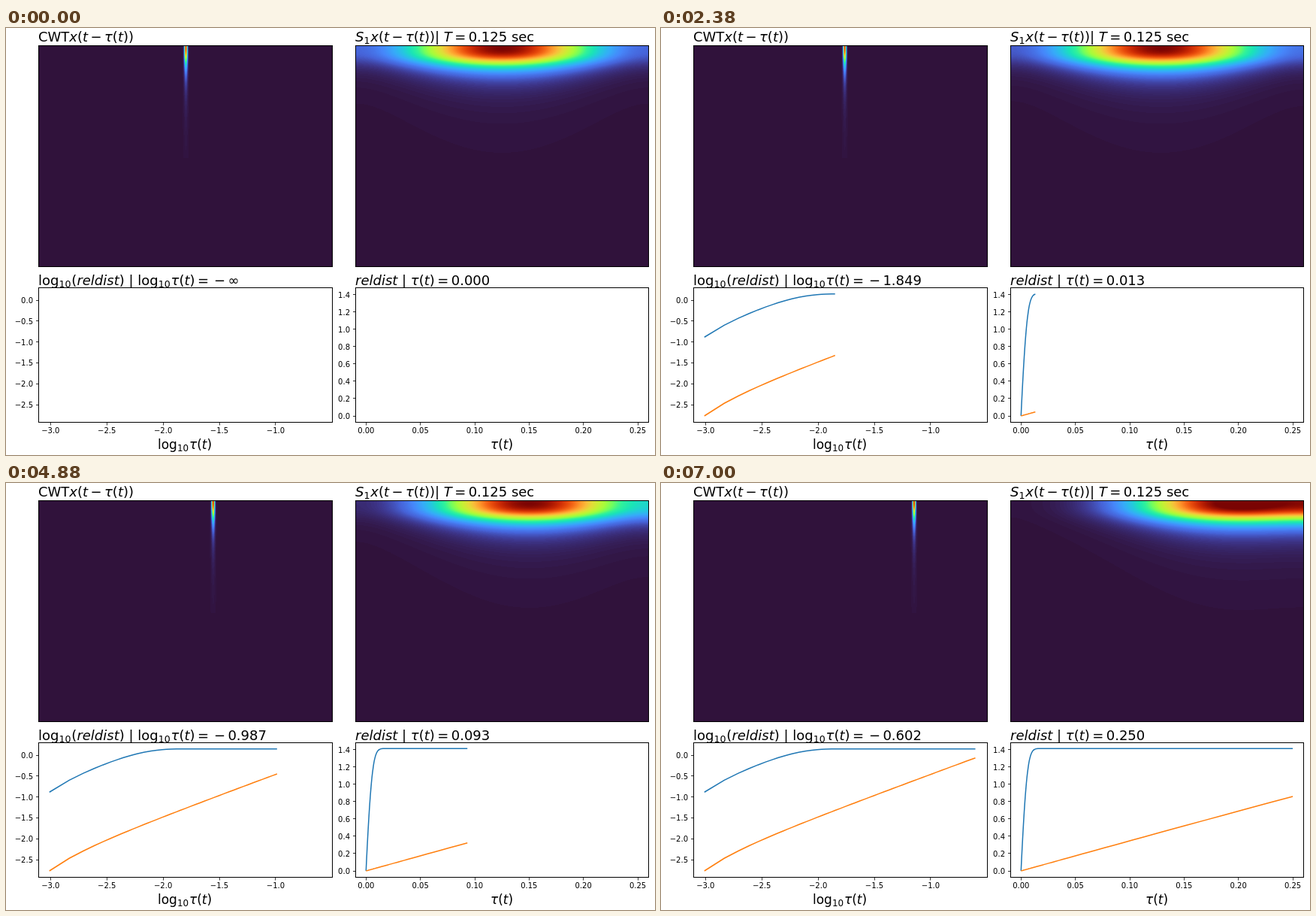
These frames come from a looping animation (864x568 px, 7.26 s). An HTML page with a canvas:

```html
<!DOCTYPE html>
<html lang="en">
<head>
<meta charset="utf-8">
<title>Time-shift distances</title>
<style>
html, body { margin: 0; width: 100%; height: 100%; overflow: hidden; background: #fff; }
canvas { display: block; }
</style>
</head>
<body>
<canvas id="stage" width="864" height="568"></canvas>
<script>
const g = document.getElementById('stage').getContext('2d');
const FONT = '"DejaVu Sans", Verdana, sans-serif';
const BLUE = '#1f77b4', ORANGE = '#ff7f0e';
const LOOP = 7260, STEP = 125, RATE = 2048, LAST = 49;

// Shifts in samples: log-spaced 1..512, rounded up, without repeats
const shifts = [...new Set(Array.from({ length: 64 },
  (_, j) => Math.ceil(512 ** (j / 63) - 1e-9)))];

// Relative distances after a shift of m samples
const waveDist = m => Math.sqrt(2 - 2 * Math.exp(-0.0085 * m ** 1.924));
const scatDist = m => { const s = m / RATE; return 3.48 * s - 0.6 * s ** 3; };

// Colour map, interpolated between even stops
const stops = ['30123b', '3d358b', '4662d7', '4686fa', '36aaf9', '24c8de', '1ae4b6',
  '32f298', '72fe5e', 'a4fc3c', 'c7ef34', 'e2dc38', 'faba39', 'fe962b', 'f66b19',
  'e5470b', 'cb2a04', 'a51401', '7a0403']
  .map(h => [0, 2, 4].map(i => parseInt(h.slice(i, i + 2), 16)));
const palette = Array.from({ length: 256 }, (_, i) => {
  const p = i / 255 * 18, k = Math.min(17, Math.floor(p));
  return stops[k].map((c, j) => c + (stops[k + 1][j] - c) * (p - k));
});

const bell = (d, s) => Math.exp(-d * d / (2 * s * s));
const fall = (u, half, power) => 1 / (1 + (u / half) ** power);

function heatmap(x0, value) {
  const w = 390, h = 294, img = g.createImageData(w, h);
  for (let y = 0, i = 0; y < h; y++) {
    for (let x = 0; x < w; x++, i += 4) {
      const v = y < 150 ? Math.min(1, value(x, y)) : 0;
      const c = palette[Math.round(v * 255)];
      img.data[i] = c[0];
      img.data[i + 1] = c[1];
      img.data[i + 2] = c[2];
      img.data[i + 3] = 255;
    }
  }
  g.putImageData(img, x0, 23);
}

// Markup: *italic*, {subscript}, ~ thin gap
function rich(x, y, size, text) {
  let italic = false;
  g.textAlign = 'left';
  for (const part of text.match(/\*|~|\{[^}]*\}|[^*~{]+/g)) {
    if (part === '*') { italic = !italic; continue; }
    if (part === '~') { x += size * 0.19; continue; }
    const sub = part[0] === '{';
    const str = sub ? part.slice(1, -1) : part;
    g.font = `${italic ? 'italic ' : ''}${size * (sub ? 0.7 : 1)}px ${FONT}`;
    g.fillText(str, x, y + (sub ? size * 0.16 : 0));
    x += g.measureText(str).width + (sub ? size * 0.05 : 0);
  }
}

function line(points, color, width) {
  g.beginPath();
  points.forEach(p => g.lineTo(p[0], p[1]));
  g.strokeStyle = color;
  g.lineWidth = width;
  g.stroke();
}

const box = (x, y, w, h) => {
  g.strokeStyle = '#000';
  g.lineWidth = 1;
  g.strokeRect(x + 0.5, y + 0.5, w, h);
};

const logPlot = {
  x: 43, w: 391, px: v => 59.3 + (v + 3) * 149.8, py: v => 362 - v * 55.6,
  xt: [-3, -2.5, -2, -1.5, -1], xd: 1, yt: [0, -0.5, -1, -1.5, -2, -2.5]
};
const linPlot = {
  x: 465, w: 390, px: v => 479.3 + v * 1447, py: v => 516 - v * 115.1,
  xt: [0, 0.05, 0.1, 0.15, 0.2, 0.25], xd: 2, yt: [0, 0.2, 0.4, 0.6, 0.8, 1, 1.2, 1.4]
};

const label = (v, d) => v.toFixed(d).replace('-', '\u2212');
const crisp = v => Math.floor(v) + 0.5;

function axes(p) {
  g.font = `10px ${FONT}`;
  g.textAlign = 'center';
  for (const v of p.xt) {
    const x = p.px(v);
    line([[crisp(x), 525], [crisp(x), 528.5]], '#000', 0.8);
    g.fillText(label(v, p.xd), x, 539);
  }
  g.textAlign = 'right';
  for (const v of p.yt) {
    const y = p.py(v);
    line([[p.x - 3, crisp(y)], [p.x, crisp(y)]], '#000', 0.8);
    g.fillText(label(v, 1), p.x - 7, y + 4);
  }
  box(p.x, 345, p.w, 179);
}

function draw(n) {
  const lead = shifts[Math.min(n + 1, shifts.length - 1)];
  const m = n ? shifts[Math.min(n, shifts.length - 1)] : 0;
  const tau = m / RATE;

  g.fillStyle = '#fff';
  g.fillRect(0, 0, 864, 568);
  g.fillStyle = '#000';

  const c = 195 + tau * 390;
  heatmap(44, (x, y) => 0.9 * bell(x - c, 1.3 + y * 0.008) * fall(y, 20, 2.6));
  // The smooth bump reflects at both borders
  heatmap(465, (x, y) => fall(y, 24, 3.5) *
    (bell(x - c, 82) + bell(x + c, 82) + bell(780 - x - c, 82)));
  box(43, 23, 391, 294);
  box(465, 23, 390, 294);

  if (n) {
    const used = shifts.slice(1).filter(s => s <= lead);
    const seen = [0, ...shifts.filter(s => s <= m)];
    for (const [dist, color] of [[waveDist, BLUE], [scatDist, ORANGE]]) {
      line(used.map(s => [logPlot.px(Math.log10(s / RATE)),
        logPlot.py(Math.log10(dist(s - 1)))]), color, 1.5);
      line(seen.map(s => [linPlot.px(s / RATE), linPlot.py(dist(s))]), color, 1.5);
    }
  }
  axes(logPlot);
  axes(linPlot);

  const shown = n ? Math.abs(Math.log10(lead / RATE)).toFixed(3) : '\u221e';
  rich(43, 18, 18, 'CWT*x*(*t*~\u2212~*τ*(*t*))');
  rich(465, 18, 18, '*S*{1}*x*(*t*~\u2212~*τ*(*t*))| *T*~=~0.125 sec');
  rich(43, 342, 18, `log{10}(*reldist*) | log{10}*τ*(*t*)~=~~\u2212~${shown}`);
  rich(465, 342, 18, `*reldist* | *τ*(*t*)~=~${tau.toFixed(3)}`);
  rich(202, 560, 17, 'log{10}*τ*(*t*)');
  rich(645, 560, 17, '*τ*(*t*)');
}

const start = performance.now();
let current = -1;
function tick() {
  const t = (performance.now() - start) % LOOP;
  const n = Math.min(LAST, Math.floor(Math.floor(t / 10) * 10 / STEP));
  if (n !== current) draw(current = n);
  requestAnimationFrame(tick);
}
tick();
</script>
</body>
</html>
```
